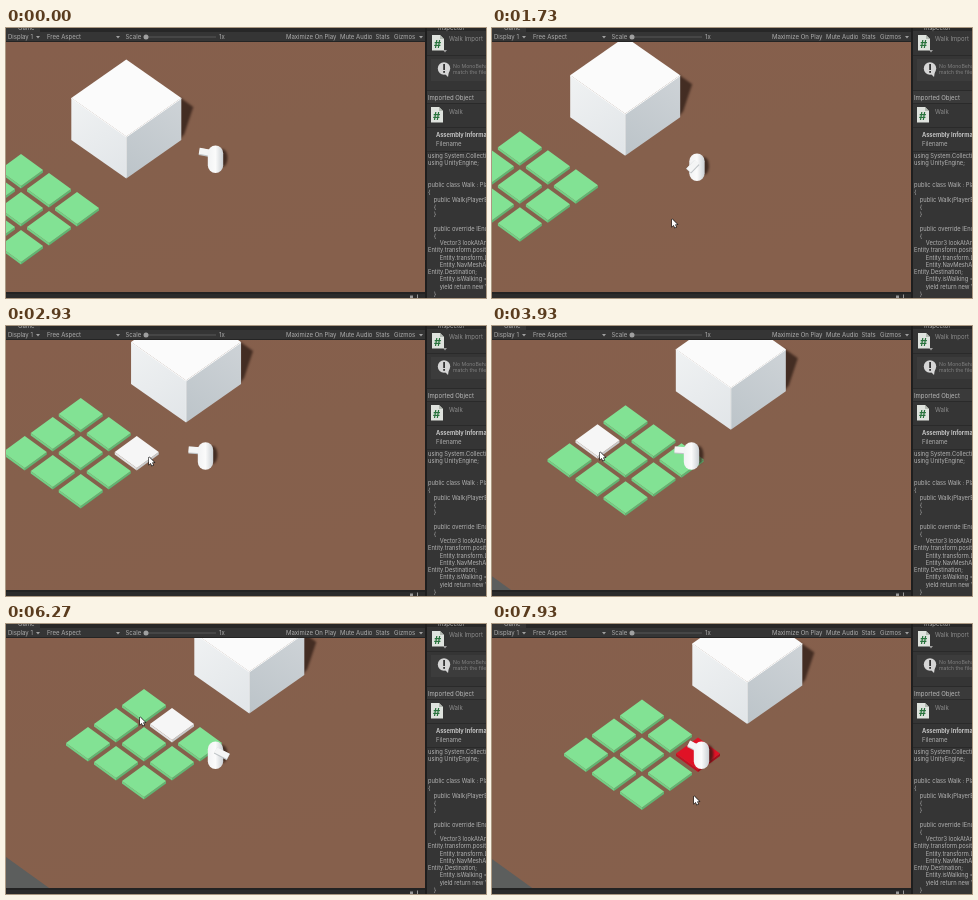
Recreate the animation shown at these times as an HTML page with a canvas. Size 480 by 270 pixels, loop 8000 ms.

```html
<!DOCTYPE html>
<html lang="en">
<head>
<meta charset="utf-8">
<title>Tile walk</title>
<style>
html, body { margin: 0; width: 100%; height: 100%; overflow: hidden; background: #353535; }
canvas { display: block; width: 480px; height: 270px; }
</style>
</head>
<body>
<canvas id="stage" width="480" height="270"></canvas>
<script>
const ctx = document.getElementById('stage').getContext('2d');
const LOOP = 8000, STEP = 200 / 3;
const CAMERA_LAG = 170, HOVER_LAG = 150;
const HOME = { x: 209.5, y: 131 };
const SHADOW = 'rgba(45,28,22,.75)';

const move = (from, to, x, y) => ({ from, to, x, y });

const walk = [
  move(-600, -500, 235, 139), move(-500, -200, HOME.x, HOME.y),
  move(1080, 2300, 177, 188.2), move(2300, 3950, 80, 176.5), move(3950, 4200, 74.5, 181.5),
  move(4680, 4920, 86.5, 192), move(7200, 7500, 74.5, 181.5)
];
const pointer = [
  move(0, 60, 138, 184), move(260, 330, 280, 212), move(530, 1700, 180, 191),
  move(2200, 2700, 143, 131), move(3070, 3700, 108, 126), move(4000, 4800, 204, 147),
  move(5400, 6100, 166, 101), move(6150, 6250, 134, 93), move(6800, 7600, 202, 172)
];

const linear = u => u;
const smooth = u => u * u * (3 - 2 * u);

// Position on a route at time t, with the direction of the latest move
function follow(route, t, ease = linear) {
  const n = Math.max(0, route.findLastIndex(m => m.from <= t));
  const b = route[n], a = route[Math.max(0, n - 1)];
  const u = ease(Math.min(1, Math.max(0, (t - b.from) / (b.to - b.from))));
  const dx = b.x - a.x, dy = b.y - a.y;
  return { x: a.x + dx * u, y: a.y + dy * u, angle: Math.atan2(dy, dx) };
}

function poly(fill, ...pts) {
  ctx.fillStyle = fill;
  ctx.beginPath();
  for (let i = 0; i < pts.length; i += 2) ctx.lineTo(pts[i], pts[i + 1]);
  ctx.closePath();
  ctx.fill();
}

function line(color, width, ...pts) {
  ctx.strokeStyle = color;
  ctx.lineWidth = width;
  ctx.beginPath();
  for (let i = 0; i < pts.length; i += 2) ctx.lineTo(pts[i], pts[i + 1]);
  ctx.stroke();
}

function rect(fill, x, y, w, h) {
  ctx.fillStyle = fill;
  ctx.fillRect(x, y, w, h);
}

function disc(fill, x, y, rx, ry = rx) {
  ctx.fillStyle = fill;
  ctx.beginPath();
  ctx.ellipse(x, y, rx, ry, 0, 0, 7);
  ctx.fill();
}

function text(str, x, y, color = '#adadad', size = 6, weight = 400) {
  ctx.font = `${weight} ${size}px Inter, Roboto, sans-serif`;
  ctx.fillStyle = color;
  ctx.fillText(str, x, y);
}

function gradient(x0, y0, x1, y1, ...colors) {
  const g = ctx.createLinearGradient(x0, y0, x1, y1);
  colors.forEach((c, i) => g.addColorStop(i / (colors.length - 1), c));
  return g;
}

function blurred(radius, paint) {
  ctx.filter = `blur(${radius}px)`;
  paint();
  ctx.filter = 'none';
}

// Isometric block: centre of the top, half width, half depth, height
function block(x, y, w, d, h, top, left, right) {
  poly(left, x - w, y, x, y + d, x, y + d + h, x - w, y + h);
  poly(right, x + w, y, x, y + d, x, y + d + h, x + w, y + h);
  poly(top, x - w, y, x, y - d, x + w, y, x, y + d);
}

function drawGround(cam) {
  rect(gradient(60, 14, 110, 264, '#865f4c', '#85604c', '#86604c'), 0, 14, 419, 250);
  const edge = 380 + cam.y - cam.x * 0.7;
  poly('#5c5e5d', 0, edge, 419, edge + 302, 0, edge + 302);
}

function drawTiles(t, cam) {
  const mouse = follow(pointer, t - HOVER_LAG, smooth);
  const feet = follow(walk, t);
  for (let i = 0; i < 3; i++) for (let j = 0; j < 3; j++) {
    const wx = 15 + 28 * (i - j), wy = 142 + 19 * (i + j);
    const x = wx + cam.x, y = wy + cam.y;
    const occupied = Math.hypot(feet.x - wx, feet.y - wy) < 5;
    const hover = Math.abs(mouse.x - x) / 22 + Math.abs(mouse.y - y) / 16 < 1;
    const colors = occupied ? ['#e01226', '#c01022', '#a80d1c']
      : hover ? ['#f6f6f6', '#e2e3e4', '#c8cacb'] : ['#82e294', '#72d086', '#5fb673'];
    block(x, y, 22, 16, 2.5, ...colors);
  }
}

function drawBox(cam) {
  const x = 120.3 + cam.x, y = 70 + cam.y, w = 55, d = 38.5, h = 42;
  blurred(1.3, () => poly(SHADOW, x + w - 2, y - 1, x + w + 12, y + 9, x + w + 3, y + 36, x + w - 2, y + h));
  block(x, y, w, d, h, '#fbfbfb',
    gradient(x - w, y, x, y + d + h, '#f0f2f3', '#e1e5e8'),
    gradient(x + w, y, x, y + d + h, '#ced3d7', '#bcc4c9'));
  line('#f8f9f9', 1, x - w, y + 0.5, x, y + d + 0.5, x + w, y + 0.5);
  line('#e8ebed', 1, x, y + d, x, y + d + h - 1);
}

function drawWalker(x, y, angle) {
  blurred(1.3, () => disc(SHADOW, x + 7, y - 1, 5, 9));
  const dx = 17 * Math.cos(angle), dy = 10 * Math.sin(angle);
  const arm = () => {
    line('#bfc4c7', 7, x, y - 4.5, x + dx, y - 4.5 + dy);
    line('#f4f5f5', 6, x, y - 5.2, x + dx, y - 5.2 + dy);
  };
  const front = dy > 0;
  if (!front) arm();
  ctx.fillStyle = gradient(x - 8, 0, x + 8, 0, '#f1f2f3', '#fbfbfb', '#c9ced2');
  ctx.beginPath();
  ctx.roundRect(x - 7.7, y - 13.5, 15.4, 27.5, 7.7);
  ctx.fill();
  if (front) arm();
}

function drawPointer(t) {
  if (t < STEP - 1) return;
  const { x, y } = follow(pointer, t, smooth);
  ctx.save();
  ctx.translate(x, y);
  const shape = [0, 0, 0, 7.4, 1.7, 5.9, 2.9, 8.6, 4.2, 8, 3, 5.4, 5.2, 5.2, 0, 0];
  line('#1c1c1c', 1.2, ...shape);
  poly('#fff', ...shape);
  ctx.restore();
}

function arrow(x, y) {
  poly('#a0a0a0', x - 2, y - 1, x + 2, y - 1, x, y + 1.5);
}

function drawToolbar() {
  rect('#272727', 0, 0, 420, 4);
  rect('#363636', 0, 0, 34, 4);
  text('Game', 12, 2);
  rect('#353535', 0, 4, 419, 9);
  rect('#242424', 0, 13, 419, 1);
  text('Display 1', 2, 11);
  text('Free Aspect', 41, 11);
  text('Scale', 119.5, 11);
  rect('#585858', 138, 8.5, 72, 1);
  disc('#a0a0a0', 140, 9, 2.5);
  text('1x', 213, 11);
  text('Maximize On Play', 280, 11);
  text('Mute Audio', 334, 11);
  text('Stats', 369.5, 11);
  text('Gizmos', 388, 11);
  [32, 112, 415].forEach(x => arrow(x, 9));
  rect('#232323', 0, 264, 420, 2);
  rect('#2b2b2b', 0, 266, 420, 4);
  rect('#999', 404, 267.5, 3, 2.5);
  rect('#999', 411, 266.5, 1, 3.5);
}

function scriptIcon(x, y) {
  poly('#dfe3de', x, y, x + 8, y, x + 12, y + 4, x + 12, y + 15.5, x, y + 15.5);
  poly('#b3b9b2', x + 8, y, x + 12, y + 4, x + 8, y + 4);
  text('#', x + 2, y + 12.5, '#28733c', 11, 700);
}

const CODE = `using System.Collections;
using UnityEngine;


public class Walk : PlayerState
{
   public Walk(PlayerEntity
   {
   }

   public override IEnumerator
   {
      Vector3 lookAtAngle
Entity.transform.position
      Entity.transform.LookAt
      Entity.NavMeshAgent
Entity.Destination;
      Entity.isWalking = true
      yield return new Wait
   }`.split('\n');

function drawInspector() {
  rect('#353535', 420, 0, 60, 270);
  rect('#1e1e1e', 419, 0, 2, 270);
  rect('#282828', 421, 0, 59, 3);
  text('Inspector', 432, 2);
  scriptIcon(426, 7);
  arrow(439, 23);
  text('Walk Import', 443, 13, '#8c8c8c');
  rect('#3c3c3c', 425, 31, 55, 22);
  disc('#d6d6d6', 438, 40.5, 6.2);
  poly('#d6d6d6', 438, 45, 443, 43, 442, 49);
  rect('#333', 437.2, 36, 1.8, 6);
  rect('#333', 437.2, 43, 1.8, 1.8);
  text('No MonoBehaviour', 447, 40, '#808080', 5.2);
  text('match the file name', 447, 46, '#808080', 5.2);
  rect('#3a3a3a', 421, 63, 59, 12);
  text('Imported Object', 422, 71.5, '#b8b8b8');
  scriptIcon(425, 79);
  text('Walk', 443, 85.5, '#8c8c8c');
  [27, 62, 75, 99, 123].forEach(y => rect('#2a2a2a', 421, y, 59, 1));
  text('Assembly Information', 430, 109, '#c4c4c4', 5.7, 700);
  text('Filename', 430, 118);
  CODE.forEach((row, i) => {
    const code = row.trimStart();
    text(code, 422 + (row.length - code.length) * 1.95, 130 + i * 7.25, '#b4b4b4', 5.75);
  });
}

function draw(t) {
  const body = follow(walk, t), eye = follow(walk, t - CAMERA_LAG);
  const cam = { x: HOME.x - eye.x, y: HOME.y - eye.y };
  ctx.save();
  ctx.beginPath();
  ctx.rect(0, 14, 419, 250);
  ctx.clip();
  drawGround(cam);
  drawTiles(t, cam);
  drawBox(cam);
  drawWalker(body.x + cam.x, body.y + cam.y, body.angle);
  drawPointer(t);
  ctx.restore();
  drawToolbar();
  drawInspector();
}

const start = performance.now();
function tick() {
  const t = (performance.now() - start) % LOOP;
  draw(Math.floor((t + 5) / STEP) * STEP % LOOP);
  requestAnimationFrame(tick);
}
tick();
</script>
</body>
</html>
```
